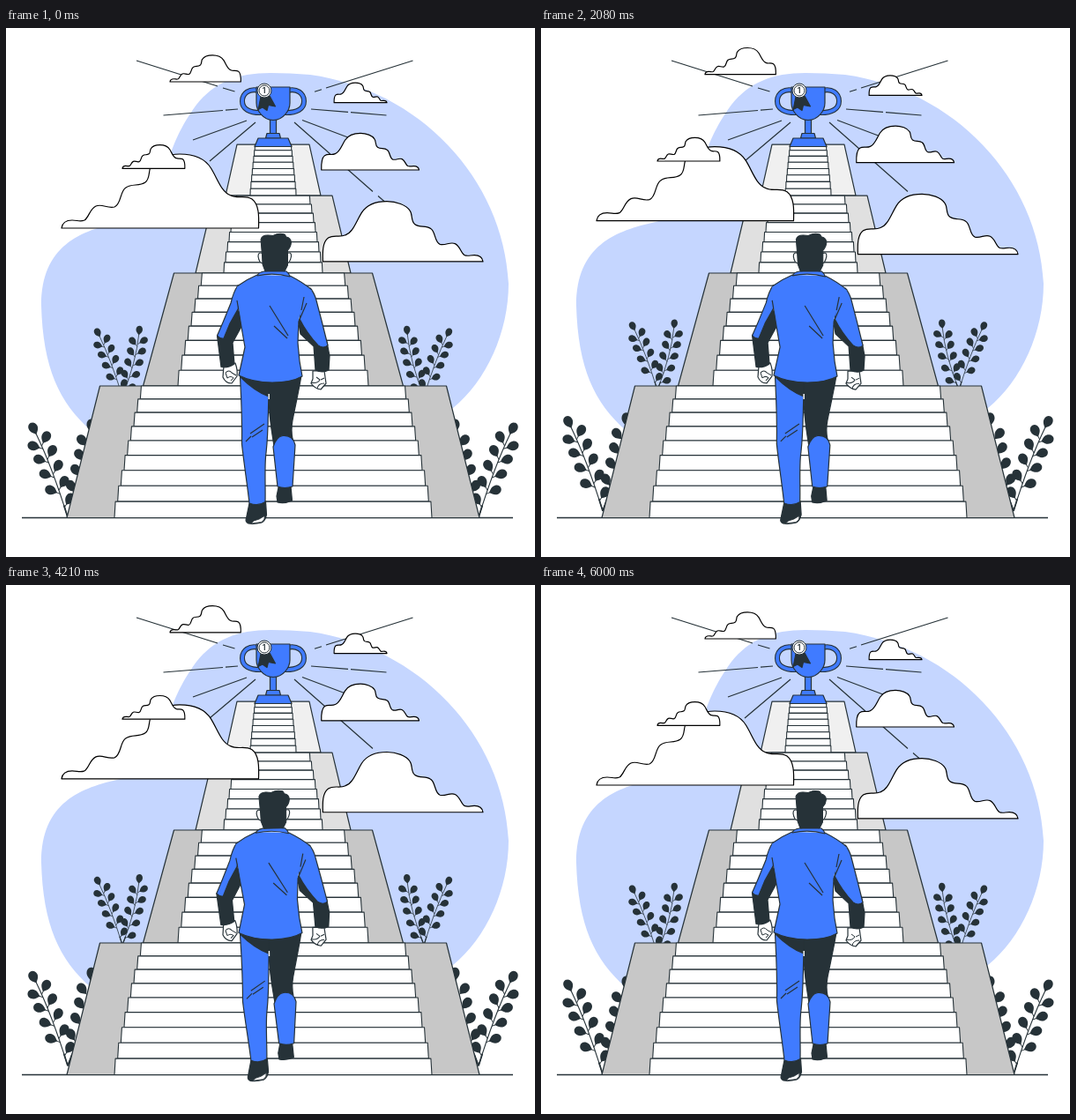
Animation, 600 px wide and 600 px high, one loop 6.04 s. Source, as an HTML page with a canvas:

```html
<!DOCTYPE html>
<html lang="en">
<head>
<meta charset="utf-8">
<title>Stairs to the trophy</title>
<style>
html, body { margin: 0; width: 100%; height: 100%; overflow: hidden; background: #fff; }
canvas { display: block; width: 600px; height: 600px; }
</style>
</head>
<body>
<canvas id="stage"></canvas>
<script>
const canvas = document.getElementById('stage');
const ctx = canvas.getContext('2d');
const dpr = window.devicePixelRatio || 1;
canvas.width = canvas.height = 600 * dpr;

const BLUE = '#407bff', DARK = '#263238', PALE = '#c5d6ff', WHITE = '#fff';
const LOOP = 6040, CYCLE = 6000;
const MID = 303;

// Draws an SVG path with an optional fill and outline.
function shape(d, fill, stroke = DARK, width = 1.2) {
  const p = typeof d === 'string' ? new Path2D(d) : d;
  if (fill) { ctx.fillStyle = fill; ctx.fill(p); }
  if (stroke) { ctx.strokeStyle = stroke; ctx.lineWidth = width; ctx.stroke(p); }
}

function at(x, y, sx, sy, draw) {
  ctx.save();
  ctx.translate(x, y);
  ctx.scale(sx, sy);
  draw();
  ctx.restore();
}

function mirrored(draw) {
  draw();
  at(2 * MID, 0, -1, 1, draw);
}

function backdrop() {
  shape('M300 51C262 51 236 62 216 87C198 112 190 130 179 165C170 195 160 212 130 220' +
    'C85 230 40 246 40 315C42 385 60 425 97 457L300 500L507 431C545 400 570 345 570 290' +
    'C564 170 468 70 345 53Q322 51 300 51Z', PALE, null);
  shape('M148 37L240 66M246 68L259.5 72M178.5 99L246 93.5M249 93.2L263 92M212 127L273 105M231 151L283 107' +
    'M461.5 37L363 68M358 69.7L350 72.3M346 92L388 95.4M391 95.7L431.5 99M389 124.5L336 104.5' +
    'M327 107L416 185.5M422 190.5L430 197.5', null);
  shape('M18 555.5H575', null, DARK, 1.4);
}

// Stem: quadratic curve from the origin with paired leaves.
function stem(cx, cy, ex, ey) {
  const point = t => {
    const a = 2 * t * (1 - t), b = t * t;
    return [a * cx + b * ex, a * cy + b * ey];
  };
  const leaf = (t, turn, gap) => {
    const [x, y] = point(t);
    const dir = Math.atan2((1 - t) * cy + t * (ey - cy), (1 - t) * cx + t * (ex - cx));
    ctx.save();
    ctx.translate(x, y);
    ctx.rotate(dir + turn);
    shape('M0 0H' + (gap + 2), null, DARK, 0.9);
    ctx.translate(gap, 0);
    shape('M0 0C3 -3 5 -5.4 9 -5.2C13 -5 14.5 -2 14.5 0C14.5 2 13 5 9 5.2C5 5.4 3 3 0 0Z', DARK, null);
    ctx.restore();
  };
  shape(`M0 0Q${cx} ${cy} ${ex} ${ey}`, null, DARK, 1.1);
  shape('M0 0L' + point(0.12).join(' '), null, DARK, 1.7);
  leaf(1, 0, -1);
  for (let i = 0; i < 5; i++) {
    leaf(0.82 - 0.18 * i, 0.87, 3.5);
    if (i < 4) leaf(0.78 - 0.18 * i, -0.87, 3.5);
  }
}

function plant() {
  stem(-18, -58, -36, -95);
  stem(22, -56, 26, -98);
}

function plants(dy) {
  mirrored(() => {
    at(132, 418 + dy, 0.72, 0.72, plant);
    at(70, 555 + dy, 1, 1, plant);
  });
}

// Half widths: outer and inner edge, top then bottom.
function flight(y0, y1, n, outTop, outBot, inTop, inBot, wall) {
  shape(`M${MID - outTop} ${y0}H${MID + outTop}L${MID + outBot} ${y1}H${MID - outBot}Z`, wall);
  const rowY = k => { const u = k / n; return y0 + (y1 - y0) * (0.88 * u + 0.12 * u * u); };
  const slope = (inBot - inTop) / n;
  for (let i = 0; i < n; i++) {
    const a = rowY(i), b = rowY(i + 1);
    const low = inTop + slope * (i + 1), top = low - slope * 0.3;
    shape(`M${MID - top} ${a}H${MID + top}L${MID + low} ${b}H${MID - low}Z`, WHITE, DARK, 1.1);
  }
}

function stairs() {
  flight(132.2, 190.2, 8, 41, 54, 20, 26, '#f0f0f0');
  flight(190.2, 278, 8, 67, 88, 40, 56, '#e0e0e0');
  flight(278, 406, 8, 112.5, 147.5, 78, 108, '#c7c7c7');
  flight(406, 555.5, 9, 196.5, 234, 147, 180, '#c7c7c7');
}

function trophy() {
  mirrored(() => {
    const handle = 'M287 71C276 68 268 74 268 83C268 91 275 97 292 96';
    shape(handle, null, DARK, 6);
    shape(handle, null, BLUE, 3.8);
  });
  shape('M299.5 102H306.5V120H299.5Z', BLUE);
  shape('M284 67H322V85C322 94 314 104.5 303 104.5C292 104.5 284 94 284 85Z', BLUE);
  shape('M296 119.5H310L311.5 125H294.5Z', BLUE);
  shape('M286 125H320L324 134.5H282Z', BLUE);
  shape('M289 78L286 92.5L291 90L296 93.5L297.5 87.5L305.5 89L299 77Z', DARK);
  for (const r of [8, 6]) {
    ctx.beginPath();
    ctx.arc(293, 71, r, 0, 7);
    ctx.fillStyle = WHITE;
    ctx.fill();
    ctx.strokeStyle = DARK;
    ctx.lineWidth = 1;
    ctx.stroke();
  }
  ctx.fillStyle = DARK;
  ctx.font = '600 9px Inter, sans-serif';
  ctx.textAlign = 'center';
  ctx.fillText('1', 292.6, 74.3);
}

const cloudPath = new Path2D('M0 0C1 -7 6 -9 12 -9C18 -9 21 -7 26 -9C31 -12 32 -22 39 -25' +
  'C46 -28 52 -22 60 -24C68 -27 66 -42 73 -46C80 -51 88 -47 95 -52C101 -56 98 -66 102 -71' +
  'C107 -79 121 -84 134 -84C149 -84 162 -80 169.5 -68C177 -56 181 -41 192 -37' +
  'C200 -33 208 -38 216 -33C224 -27 224 -14 223.5 0Z');

// x is the thin end; a negative width points the cloud left.
function cloud(x, y, width) {
  const s = width / 224;
  at(x, y, s, Math.abs(s), () => shape(cloudPath, WHITE, '#000', 1.2 / Math.abs(s)));
}

function clouds(dy) {
  cloud(186, 61 + dy, 80.5);
  cloud(63, 227 + dy, 224);
  cloud(132, 159.3 + dy, 71);
  cloud(432, 84.7 + dy, -60);
  cloud(468.5, 161 + dy, -111);
  cloud(541, 264.9 + dy, -182);
}

function legs() {
  shape('M309 521L323 519.5L324.5 536Q316 540 308 538L307 531Z', DARK);
  shape('M268 394L335 394C332 412 329 425 325 445Q323 456 325 466L304 474C301 455 298 440 298 416L280 409Z', DARK);
  shape('M303 475C306 466 310 463 314 462.5C320 462 326 464 328 473L325 520Q316 523 308 520Z', BLUE);
  shape('M276 539L294.5 537L295.5 552Q294 559 290 561Q282 563 275 562Q271 560 272.5 556Z', DARK);
  shape('M281 559Q287 558 293 553.5Q294 558 289.5 560.5L278 562Z', WHITE, DARK, 0.8);
  shape('M265.5 395C267 425 268 440 267.5 472C270 495 274 520 276 539Q286 543 294 537.5' +
    'C294.5 520 293 495 295 482C298 455 297 435 298 416Z', BLUE);
  shape('M266 396Q282 412 298 418V400H280Z', DARK);
  shape('M298.2 415V421', null, WHITE, 1.4);
  shape('M277 460L293 449M272 469L278 463M279 464L291 456', null, DARK, 1.2);
}

function arms() {
  shape('M247 383L260 380Q263 388 262 395L256 403Q249 403 246 396Z', WHITE);
  shape('M249 391Q253 387 256 391L261 394M251 397Q255 394 258 397L255 400M249 391L251 397', null, DARK, 1);
  shape('M348 389L361 389L363 403L357 410Q350 409 346 403L348 398Z', WHITE);
  shape('M346 402Q353 404 356 399L352 396M353 409Q354 403 361 403M357 399L361 397', null, DARK, 1);
  shape('M239.5 349L262 318L269 335L257 357L259 381Q252 386 244 384.5Z', DARK);
  shape('M331 330L334 347L349 361L351 388Q359 392 366 388L367 372L364 356Z', DARK);
  shape('M263 292Q258 299 255 312L246 334L239.5 349Q243 353 247 352L254 335L263 319L270 300Z', BLUE);
  shape('M345 295Q350 301 352 309L358 332L365 360Q360 364 354 360Q341 346 333 330L336 300Z', BLUE);
}

function torso() {
  shape('M285 280Q273 285 262 293C262 308 265 325 267 339L271 362Q267 380 264 394' +
    'Q280 402 302 402Q324 402 336 395L333 378L331 357L332 330L339 311L347 297Q336 288 322 281Z', BLUE, null);
  shape('M285 280Q273 285 262 293M262 309L267 339L271 362Q267 380 264 394Q280 402 302 402' +
    'Q324 402 336 395L333 378L331 357L332 333L341 312M338 305L335 320M347 297Q336 288 322 281', null);
  shape('M299 315L320 349M304 338L319 352', null);
}

function head() {
  shape('M292 256Q286 253 286 259Q287 267 292 267Z', WHITE);
  shape('M318 256Q324 253 323.5 259Q322 267 318 267Z', WHITE);
  shape('M285 281Q286 277 293 276Q306 274 318 276Q321 278 322 282Q304 277 285 281Z', BLUE);
  shape('M290.5 258L289 240Q290 235 297 235L303 235.5Q309 232 316 234L318 237Q323 238 323.5 243' +
    'Q323 249 319.5 252V269L316 276H294L291 268Z', DARK, DARK, 1);
}

// 0 to 1 and back within the period.
const bounce = (t, period) => 1 - Math.abs(1 - 2 * (t % period) / period);

// Sway in degrees: 0, 1, -1, 0 at 0, 25, 75 and 100 percent.
function sway(t) {
  const p = (t % 1500) / 1500;
  return p < 0.25 ? 4 * p : p < 0.75 ? 2 - 4 * p : 4 * p - 4;
}

function man(t) {
  const lag = 60;
  ctx.save();
  ctx.translate(MID, 398);
  ctx.rotate((sway(t + lag) - sway(lag)) * Math.PI / 180);
  ctx.translate(-MID, -398);
  legs();
  arms();
  torso();
  head();
  ctx.restore();
}

function draw(now) {
  const t = Math.min(now % LOOP, CYCLE);
  ctx.setTransform(dpr, 0, 0, dpr, 0, 0);
  ctx.lineJoin = 'round';
  ctx.fillStyle = WHITE;
  ctx.fillRect(0, 0, 600, 600);
  backdrop();
  plants(-12 * bounce(t, 3000));
  stairs();
  trophy();
  clouds(-12 * bounce(t, 6000));
  man(t);
}

const start = performance.now();
function tick() {
  draw(performance.now() - start);
  requestAnimationFrame(tick);
}
tick();
</script>
</body>
</html>
```
